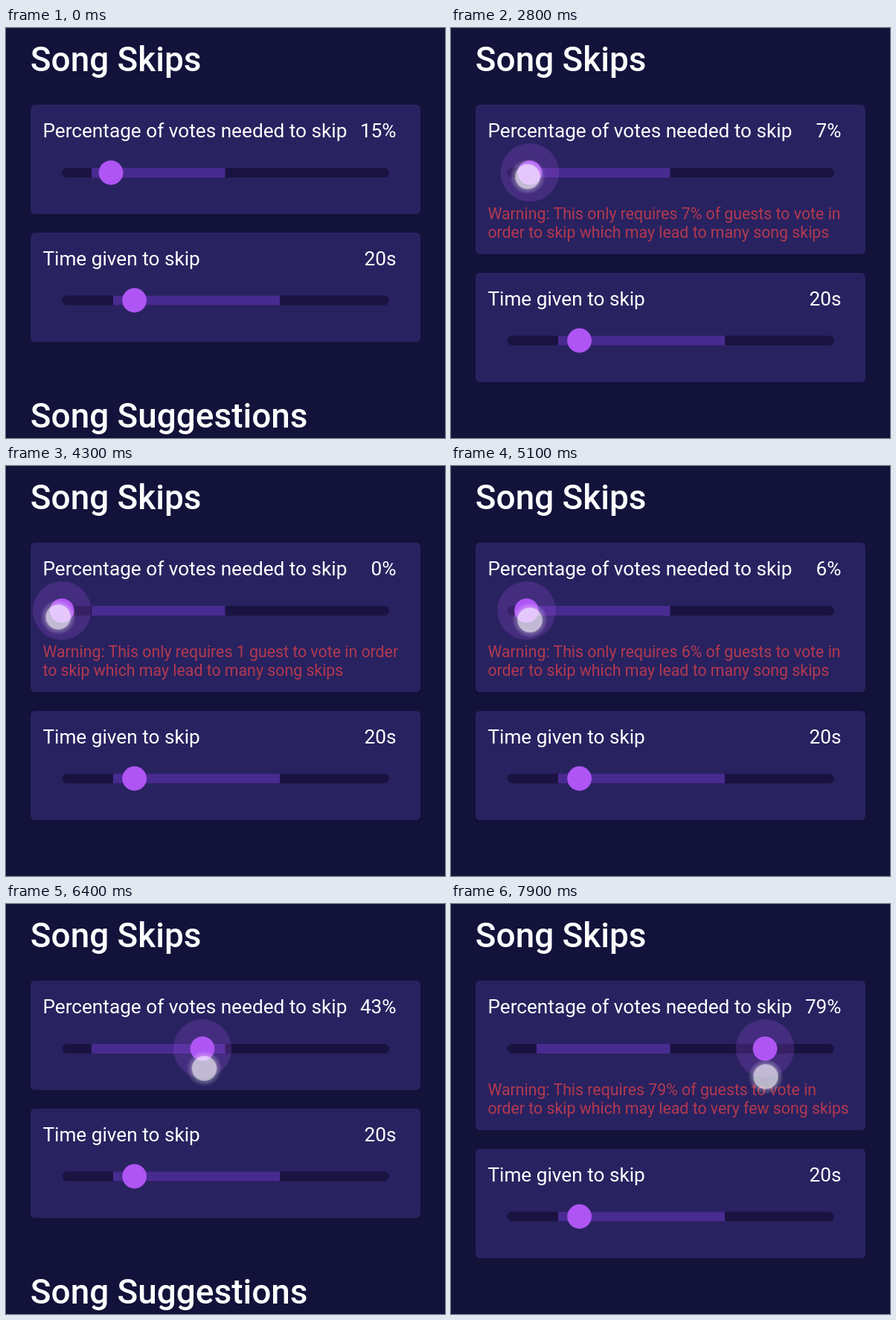
These frames come from a looping animation (590x551 px, 8 s). An HTML page:

```html
<!DOCTYPE html>
<html lang="en">
<head>
<meta charset="utf-8">
<title>Song skip settings</title>
<style>
  html, body { margin: 0; width: 590px; height: 551px; overflow: hidden; background: #12123a; }
  svg { display: block; }
  text { font: 26.2px Roboto, sans-serif; fill: #fff; }
  .title { font-size: 45.9px; font-weight: 500; }
  .value { text-anchor: end; }
  .warning text { font-size: 21.3px; fill: #b2394f; }
  .card { fill: #292260; }
  .track { fill: #1a1341; }
  .zone { fill: #482b90; }
  .thumb { fill: #ae55f3; }
</style>
</head>
<body>
<svg width="590" height="551" viewBox="0 0 590 551">
  <defs>
    <radialGradient id="glow">
      <stop offset="0" stop-color="#fff" stop-opacity=".66"/>
      <stop offset=".66" stop-color="#fff" stop-opacity=".68"/>
      <stop offset=".73" stop-color="#fff" stop-opacity=".26"/>
      <stop offset="1" stop-color="#fff" stop-opacity="0"/>
    </radialGradient>
  </defs>

  <text class="title" x="32.8" y="58">Song Skips</text>
  <rect class="card" id="votes" x="33" y="103" width="524" height="147" rx="6"/>
  <text x="49.4" y="147">Percentage of votes needed to skip</text>
  <text class="value" id="percent" x="524.5" y="147"></text>
  <rect class="track" x="75.5" y="188" width="439.5" height="13" rx="6.5"/>
  <rect class="zone" x="115" y="188" width="179.5" height="13"/>
  <circle class="thumb" id="halo" cy="194.3" opacity=".2"/>
  <circle class="thumb" id="thumb" cy="194.3" r="16.4"/>
  <g class="warning" id="warning">
    <text x="49.4" y="257"></text>
    <text x="49.4" y="282"></text>
  </g>

  <g id="below">
    <rect class="card" x="33" y="275" width="524" height="147" rx="6"/>
    <text x="49.4" y="319">Time given to skip</text>
    <text class="value" x="524.5" y="319">20s</text>
    <rect class="track" x="75.5" y="359.5" width="439.5" height="13" rx="6.5"/>
    <rect class="zone" x="144" y="359.5" width="224" height="13"/>
    <circle class="thumb" cx="172.6" cy="366" r="16.4"/>
    <text class="title" x="32.8" y="537">Song Suggestions</text>
  </g>

  <circle id="touch" r="24" fill="url(#glow)"/>
</svg>
<script>
const LOOP = 8000, STEP = 100, PRESS = 2300;

// time, percentage, finger offset from the thumb, finger height
const drag = [
  [2300, 12, 0, 198], [2400, 12, 0, 198], [3300, 0, -6.5, 202], [4000, 0, -7, 202],
  [4300, 0, -5, 203], [4700, 0, -5, 203], [5100, 6, 4.5, 207], [5700, 24, 2, 217.5],
  [7000, 59, 3, 224], [7900, 79, 1, 232],
];

const $ = id => document.getElementById(id);
const set = (id, attrs) => {
  for (const name in attrs) $(id).setAttribute(name, attrs[name]);
};

function sample(t) {
  if (t < PRESS) return [t, 15, 0, 198];
  const i = Math.max(1, drag.findIndex(row => row[0] >= t));
  const a = drag[i - 1], b = drag[i];
  const k = (t - a[0]) / (b[0] - a[0]);
  return a.map((n, j) => n + (b[j] - n) * k);
}

function warningLines(v) {
  if (v === 0) return ["Warning: This only requires 1 guest to vote in order", "to skip which may lead to many song skips"];
  const low = v < 9;
  return [
    `Warning: This ${low ? "only " : ""}requires ${v}% of guests to vote in`,
    `order to skip which may lead to ${low ? "many" : "very few"} song skips`,
  ];
}

function render(t) {
  const [, level, offset, y] = sample(t);
  const v = Math.round(level), x = 75.2 + 4.39 * v;
  const warn = v < 9 || v > 50;
  const pressed = t >= PRESS;

  $("percent").textContent = v + "%";
  set("thumb", { cx: x });
  set("halo", { cx: x, r: pressed ? Math.min(39.3, (t - PRESS) * .25) : 0 });
  set("touch", { cx: x + offset, cy: y, visibility: pressed ? "visible" : "hidden" });

  set("votes", { height: warn ? 201 : 147 });
  set("below", { transform: `translate(0 ${warn ? 54 : 0})` });
  set("warning", { visibility: warn ? "visible" : "hidden" });
  if (warn) warningLines(v).forEach((line, i) => $("warning").children[i].textContent = line);
}

const start = performance.now();
function tick() {
  const t = (performance.now() - start) % LOOP;
  render(Math.floor(t / STEP) * STEP);
  requestAnimationFrame(tick);
}
tick();
</script>
</body>
</html>
```
